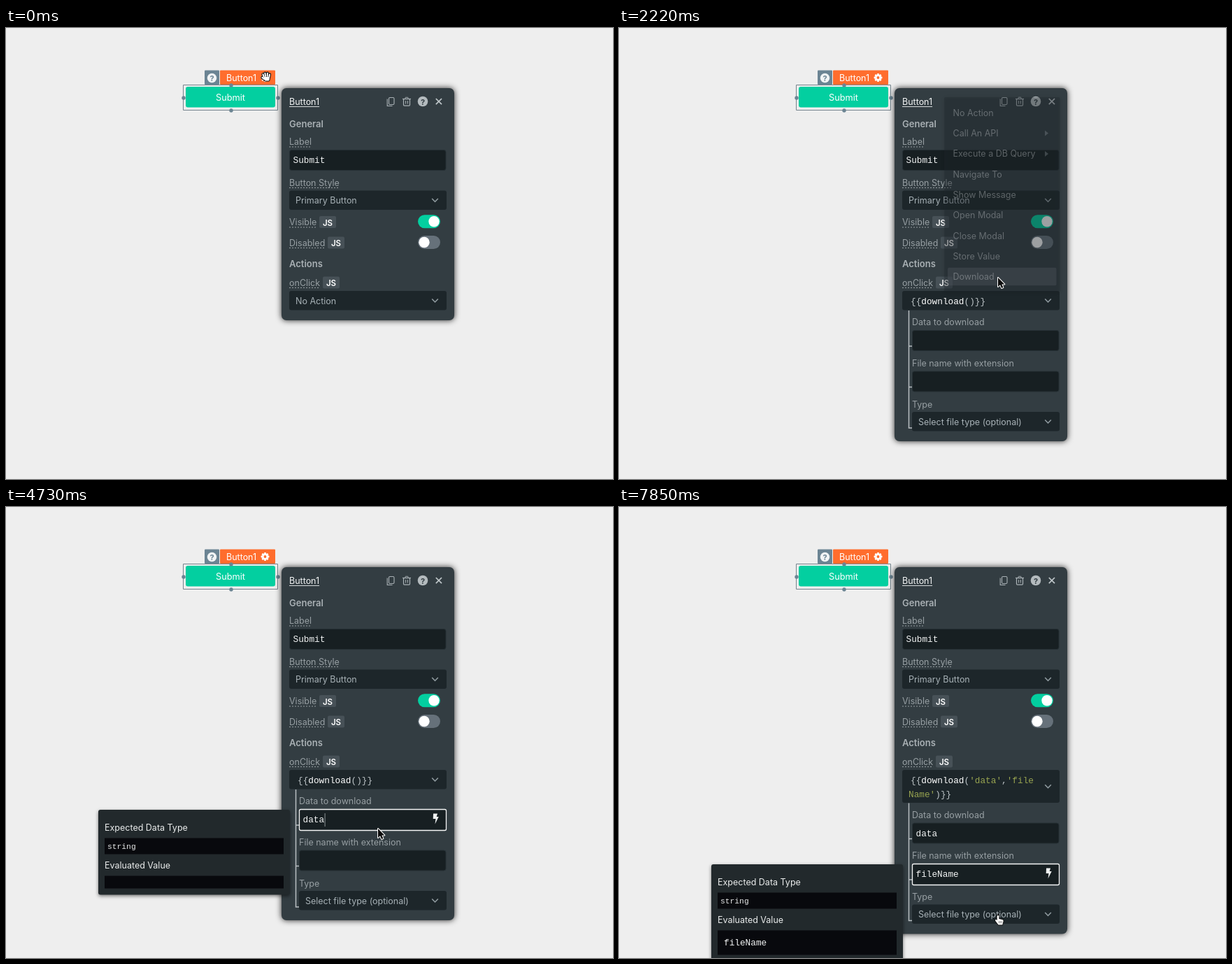
An HTML page with a canvas that plays this animation: 868x645 px, repeating every 8000 ms.

```html
<!DOCTYPE html>
<html lang="en">
<head>
<meta charset="utf-8">
<title>Button properties</title>
<style>
html, body { margin: 0; width: 100%; height: 100%; overflow: hidden; background: #eee; }
canvas { display: block; width: 868px; height: 645px; }
</style>
</head>
<body>
<canvas id="stage" width="868" height="645"></canvas>
<script>
const ctx = document.getElementById('stage').getContext('2d');
const LOOP = 8000;
const SANS = 'Inter, sans-serif';
const MONO = '"Liberation Mono", monospace';
const CHAR = 7.65, WRAP = 23;
const C = {
  green: '#03cfa0', orange: '#ff6d2d', slate: '#6b8493', panel: '#333d42',
  input: '#171f22', select: '#1d262a', label: '#979fa3', value: '#a7b1b6',
  icon: '#aab2b6', popup: '#22292c', menu: '#222a30', string: '#98a450'
};

// ---- timeline helpers ----
const at = (t, keys) => keys.reduce((v, [time, value]) => t >= time ? value : v, keys[0][1]);

function glide(t, start, end, steps, from, to) {
  const gap = (end - start) / (steps - 1);
  const p = Math.min(1, Math.max(0, (Math.floor((t - start) / gap + 0.05) + 1) / steps));
  const e = p * p * (3 - 2 * p);
  return from.map((v, i) => v + (to[i] - v) * e);
}

function pointer(t) {
  if (t < 150) return ['grab', 372, 70];
  if (t < 1330) return [t < 740 ? 'arrow' : 'hand', ...glide(t, 150, 1030, 7, [372, 64], [533.5, 390])];
  if (t < 2220) return ['hand', ...glide(t, 1630, 1770, 2, [533.5, 390], [540, 352])];
  if (t < 2510) return ['arrow', 542, 357];
  if (t < 3850) return [t < 2810 ? 'arrow' : 'beam', ...glide(t, 2510, 2950, 4, [542, 357], [535, 448])];
  if (t < 4730) return null;
  if (t < 6070) return [t < 5170 ? 'arrow' : 'beam', ...glide(t, 4880, 5320, 4, [532, 460], [530, 506])];
  if (t < 6810) return null;
  if (t < 7410) return ['arrow', 528, 503];
  return t < 7850 ? null : ['hand', 542, 584];
}

function stateAt(t) {
  const code = at(t, [
    [0, ''], [2220, '{{download()}}'], [4880, "{{download('data')}}"],
    [6960, "{{download('data','file')}}"], [7560, "{{download('data','fileNam')}}"],
    [7700, "{{download('data','fileName')}}"]
  ]);
  return {
    code,
    shift: code.length > WRAP ? 19.5 : 0,
    data: at(t, [[0, ''], [3850, 'd'], [4000, 'da'], [4140, 'dat'], [4290, 'data']]),
    file: at(t, [[0, ''], [6070, 'f'], [6220, 'fil'], [6360, 'file'],
      [7410, 'fileN'], [7560, 'fileNam'], [7700, 'fileName']]),
    focus: at(t, [[0, ''], [2950, 'data'], [5320, 'file']]),
    bolt: t >= 3250,
    caret: t < 7850,
    menu: at(t, [[0, 0], [1330, 0.88], [1480, 1], [2220, 0.35], [2370, 0]]),
    choice: t < 1770 ? 0 : 8,
    popupY: at(t, [[0, 0], [3250, 433], [5470, 491.5], [7110, 511]]),
    result: at(t, [[0, ''], [5030, 'data'], [5470, ''], [7110, 'file'],
      [7560, 'fileNam'], [7850, 'fileName']])
  };
}

// ---- drawing helpers ----
function box(x, y, w, h, r, fill, stroke, line = 1) {
  ctx.beginPath();
  ctx.roundRect(x, y, w, h, r);
  if (fill) { ctx.fillStyle = fill; ctx.fill(); }
  if (stroke) { ctx.strokeStyle = stroke; ctx.lineWidth = line; ctx.stroke(); }
}

function shadowed(color, blur, dy, draw) {
  ctx.save();
  ctx.shadowColor = color;
  ctx.shadowBlur = blur;
  ctx.shadowOffsetY = dy;
  draw();
  ctx.restore();
}

function dot(x, y, r, fill) {
  ctx.beginPath();
  ctx.arc(x, y, r, 0, Math.PI * 2);
  ctx.fillStyle = fill;
  ctx.fill();
}

function line(points, color, width = 1) {
  ctx.beginPath();
  points.forEach(([x, y]) => ctx.lineTo(x, y));
  ctx.strokeStyle = color;
  ctx.lineWidth = width;
  ctx.stroke();
}

function text(str, x, cy, color, font = `12.5px ${SANS}`, align = 'left') {
  ctx.font = font;
  ctx.textAlign = align;
  ctx.fillStyle = color;
  ctx.fillText(str, x, cy + 4.5);
  return ctx.measureText(str).width;
}

const mono = (str, x, cy, color = '#f2f4f4', size = 12.75) => text(str, x, cy - 0.5, color, `${size}px ${MONO}`);
const heading = (str, cy) => text(str, 405, cy, '#a9b0b4', `600 13px ${SANS}`);

function property(str, cy) {
  const w = text(str, 405, cy, C.label);
  ctx.setLineDash([2, 2]);
  line([[405, cy + 7.5], [405 + w, cy + 7.5]], C.label);
  ctx.setLineDash([]);
}

function badge(x, cy) {
  box(x, cy - 9, 24, 17, 2, '#475157');
  text('JS', x + 12, cy, '#fff', `600 11.5px ${SANS}`, 'center');
}

function chevron(x, y) {
  line([[x - 4.3, y - 2.3], [x, y + 2.2], [x + 4.3, y - 2.3]], '#919ca1', 1.6);
}

function select(x, y, h, value) {
  box(x, y, 630 - x, h, 3, C.select);
  if (value) text(value, x + 9, y + 14, C.value);
  chevron(613.5, y + h / 2);
}

function field(x, y, value, focused, s) {
  if (!focused) {
    box(x + 0.5, y + 0.5, 628.5 - x, 29, 3, C.input, '#263035');
  } else {
    box(x + 0.5, y + 0.5, 210, 30, 2, C.input, '#f4f5f5', 1.3);
    if (s.bolt) bolt(614, y + 14);
    if (s.caret) {
      const cx = x + 6.5 + value.length * CHAR;
      line([[cx, y + 6], [cx, y + 25]], '#8d9598');
    }
  }
  mono(value, x + 5.5, y + 15);
}

function bolt(x, y) {
  ctx.fillStyle = '#f0f2f2';
  ctx.fill(new Path2D(`M${x - 3} ${y - 7.5}h6l-1.3 4.5h3l-5.2 10.5l1-7.5h-3.8z`));
}

function toggle(cy, on) {
  box(589, cy - 9.5, 32, 19, 9.5, on ? C.green : '#66717a');
  dot(on ? 612 : 598, cy, 7.7, '#fff');
}

function help(x, y, r, fill, mark) {
  dot(x, y, r, fill);
  text('?', x, y, mark, `700 11px ${SANS}`, 'center');
}

function codeValue(code, y) {
  let quoted = false;
  [...code].forEach((ch, i) => {
    const quote = ch === "'";
    const color = quoted || quote ? C.string : /\w/.test(ch) ? '#fff' : '#bcc3c6';
    if (quote) quoted = !quoted;
    const second = i >= WRAP;
    mono(ch, second ? 414 + (i - WRAP) * CHAR : 417 + i * CHAR, second ? y + 19.5 : y, color);
  });
}

// ---- scene parts ----
function gear(x, y) {
  ctx.save();
  ctx.translate(x, y);
  for (let i = 0; i < 8; i++) {
    ctx.rotate(Math.PI / 4);
    box(-1.4, -5.9, 2.8, 4, 0.6, '#fff');
  }
  dot(0, 0, 4.4, '#fff');
  dot(0, 0, 1.9, C.orange);
  ctx.restore();
}

function widget() {
  box(253.5, 81.5, 135, 36, 0, null, '#75848d');
  box(257, 84, 128, 29.5, 3, C.green);
  text('Submit', 321, 99, '#fff', `12.75px ${SANS}`, 'center');
  box(284, 60.5, 21, 20.5, 1, C.slate);
  help(294.5, 71.5, 6.7, '#f1f4f5', C.slate);
  box(306, 60.5, 79, 20.5, 1, C.orange);
  text('Button1', 315, 71, '#fff');
  gear(370.5, 71);
  [[254, 100], [389, 100], [322, 82], [322, 118]].forEach(([x, y]) => dot(x, y, 2.7, C.slate));
}

function headerIcons() {
  box(547.5, 99.5, 7.5, 10, 1.5, null, C.icon, 1.1);
  line([[545.2, 101.5], [545.2, 111.5], [552.5, 111.5]], C.icon, 1.1);
  line([[567, 101.5], [579, 101.5]], C.icon, 1.2);
  box(571, 99.3, 4, 2.2, 0.5, null, C.icon, 1);
  box(568.5, 101.5, 9, 9.7, 1.2, null, C.icon, 1.2);
  line([[571.6, 104], [571.6, 108.5]], C.icon);
  line([[574.4, 104], [574.4, 108.5]], C.icon);
  help(596, 105, 7.3, '#b4bbbe', C.panel);
  line([[614.8, 101], [623, 109.2]], '#c1c8cb', 1.7);
  line([[623, 101], [614.8, 109.2]], '#c1c8cb', 1.7);
}

function panel(s) {
  const height = s.code ? 505 + s.shift : 332;
  shadowed('rgba(0,0,0,.85)', 9, 0, () => box(394, 86, 247, height, 7, C.panel));
  const w = text('Button1', 405, 105.5, '#f1f3f3');
  line([[405, 112.5], [405 + w, 112.5]], '#d5d9da');
  headerIcons();
  heading('General', 137);
  property('Label', 162.5);
  field(405, 174, 'Submit', false, s);
  property('Button Style', 221);
  select(405, 232.5, 27.5, 'Primary Button');
  property('Visible', 277.5);
  badge(448, 278);
  toggle(276.8, true);
  property('Disabled', 307);
  badge(460, 307.5);
  toggle(306.5, false);
  heading('Actions', 337.5);
  property('onClick', 364);
  badge(453, 364.5);
  select(405, 376, 27.5 + s.shift, s.code ? '' : 'No Action');
  if (!s.code) return;

  codeValue(s.code, 391);
  ctx.save();
  ctx.translate(0, s.shift);
  line([[414.5, 404], [414.5, 572], [419, 572]], '#b9bfc2', 1.5);
  [455, 513.5].forEach(y => line([[414, y], [419.5, y]], '#b9bfc2', 1.5));
  text('Data to download', 419, 420.5, C.label);
  field(419, 432, s.data, s.focus === 'data', s);
  text('File name with extension', 419, 479, C.label);
  field(419, 490.5, s.file, s.focus === 'file', s);
  text('Type', 419, 538, C.label);
  select(419, 549, 27.5, 'Select file type (optional)');
  ctx.restore();
}

function menu(s) {
  if (!s.menu) return;
  const items = ['No Action', 'Call An API', 'Execute a DB Query', 'Navigate To', 'Show Message',
    'Open Modal', 'Close Modal', 'Store Value', 'Download'];
  ctx.save();
  ctx.globalAlpha = s.menu;
  shadowed('rgba(0,0,0,.35)', 5, 1, () => box(465, 99, 165.5, 278, 2, C.menu));
  items.forEach((item, i) => {
    const y = 121.3 + i * 29.3;
    if (i === s.choice) box(470, y - 13, 155.5, 25.5, 2, '#535b61');
    text(item, 477.5, y, '#d9dddf');
    if (i === 1 || i === 2) {
      ctx.fillStyle = '#899398';
      ctx.fill(new Path2D(`M609 ${y - 4}l5 4l-5 4z`));
    }
  });
  ctx.restore();
}

function popup(s) {
  if (!s.popupY) return;
  const grow = s.result ? 17 : 0;
  ctx.save();
  ctx.translate(0, s.popupY);
  shadowed('rgba(0,0,0,.5)', 5, 2, () => box(132, 0, 274, 121.5 + grow, 3, C.popup));
  text('Expected Data Type', 141, 25, '#e9ebeb');
  box(141, 40.5, 256, 23, 0, '#08090d');
  mono('string', 145, 51.5, '#e6e8e8', 11.3);
  text('Evaluated Value', 141, 79.5, '#e9ebeb');
  box(141, 94.5, 256, 18 + grow, 0, '#08090d');
  mono(s.result, 150, 111.5);
  ctx.restore();
}

const SHAPES = {
  arrow: new Path2D('M0 0V13L3 10.3L5.2 15L7.4 14L5.3 9.5H9.3Z'),
  hand: new Path2D('M-1.3 1Q0-1 1.3 1V5L6.4 6.3Q7.9 6.8 7.6 8.3L6.8 11.5L6.3 13.5H.5L-3.7 8Q-4.6 6.5-3.2 6.1Q-2.3 6-1.3 7.3Z'),
  fingers: new Path2D('M-3.3 0L-4.5-3.8M-1 -1L-1.6-5.3M1.7-1L1.9-5.3M4.3 0L5-3.6M-3 3L-5.6 .8M-2 1L4 1L3.4 4.5L-1 4.5Z'),
  beam: new Path2D('M-3-6.5Q0-6.5 0-4.5Q0-6.5 3-6.5M0-4.5V4.5M-3 6.5Q0 6.5 0 4.5Q0 6.5 3 6.5M-1.8 1.5H1.8')
};

function cursor(t) {
  const found = pointer(t);
  if (!found) return;
  const [kind, x, y] = found;
  const stroke = (shape, color, width) => {
    ctx.strokeStyle = color;
    ctx.lineWidth = width;
    ctx.stroke(shape);
  };
  ctx.save();
  ctx.translate(x, y);
  ctx.lineJoin = ctx.lineCap = 'round';
  const shape = SHAPES[kind];
  if (kind === 'grab') {
    stroke(SHAPES.fingers, '#111', 4.2);
    stroke(SHAPES.fingers, '#fff', 2);
    ctx.fillStyle = '#fff';
    ctx.fillRect(-2, 0, 6, 4.5);
  } else if (kind === 'beam') {
    stroke(shape, '#fff', 2.6);
    stroke(shape, '#111', 1);
  } else {
    const arrow = kind === 'arrow';
    stroke(shape, arrow ? '#fff' : '#111', arrow ? 2 : 1.8);
    ctx.fillStyle = arrow ? '#0b0b0b' : '#fff';
    ctx.fill(shape);
    if (!arrow) stroke(new Path2D('M1.5 8.5V11M3.4 8.5V11M5.2 8.5V11'), '#333', 0.6);
  }
  ctx.restore();
}

function frame() {
  const t = performance.now() % LOOP;
  const s = stateAt(t);
  ctx.fillStyle = '#eee';
  ctx.fillRect(0, 0, 868, 645);
  widget();
  panel(s);
  menu(s);
  popup(s);
  cursor(t);
  requestAnimationFrame(frame);
}
frame();
</script>
</body>
</html>
```
